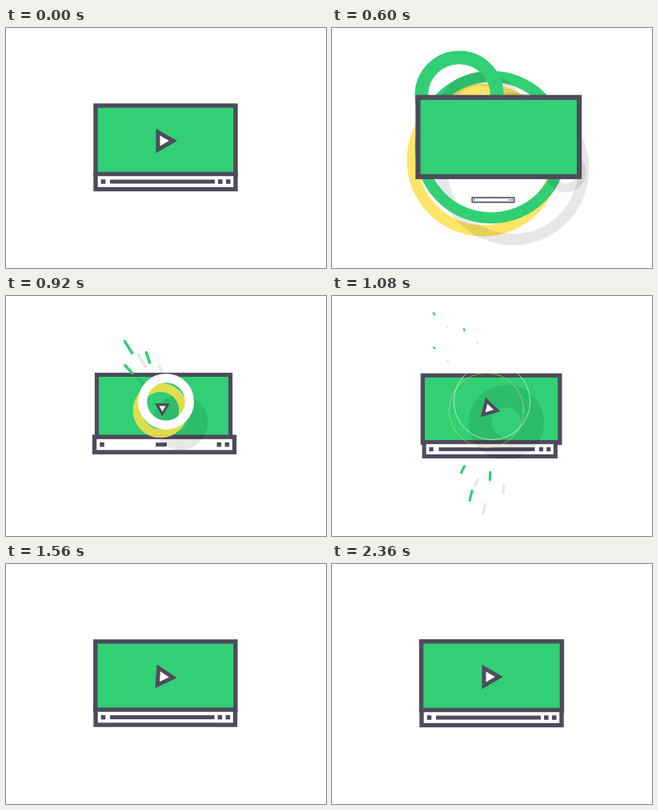
These frames come from a looping animation (400 by 300 pixels, 2.4 s). An HTML page:

```html
<!DOCTYPE html>
<html lang="en">
<head>
<meta charset="utf-8">
<title>Video player pop</title>
<style>
html, body { margin: 0; width: 100%; height: 100%; overflow: hidden; background: #fff; }
svg { display: block; width: 100vw; height: 100vh; }
</style>
</head>
<body>
<svg id="stage" viewBox="0 0 400 300"></svg>
<script>
const LOOP = 2400, STEP = 40, RETURN = 360;
const DARK = '#4d4b5c', GREEN = '#32cf74', TEAL = '#4fae9f', WHITE = '#fff';
const YELLOW = 'rgba(254,225,76,.85)', SHADE = 'rgba(0,0,0,.095)';
const stage = document.getElementById('stage');

const clamp = v => Math.min(1, Math.max(0, v));
const span = (t, from, to) => clamp((t - from) / (to - from));
const easeOut = (p, n = 3) => 1 - (1 - clamp(p)) ** n;
const easeInOut = (p, n) => p < .5 ? (2 * p) ** n / 2 : 1 - (2 - 2 * p) ** n / 2;
const backIn = p => p * p * (1.8 * p - .8);

// Damped swing that crosses zero at `cross` and every `half` ms around it
const swing = (t, cross, size, half = 300, decay = 234) =>
  size * Math.exp((cross - t) / decay) * Math.sin(Math.PI * (t - cross) / half);

const rect = (x, y, w, h, attrs) =>
  `<rect x="${x}" y="${y}" width="${w}" height="${h}" ${attrs}/>`;

const placed = (x, y, s, body) => s < .01 ? '' :
  `<g transform="translate(${x} ${y}) scale(${s})">${body}</g>`;

const panel = (h, fill) =>
  rect(-87.5, -h / 2, 175, h, `fill="${fill}" stroke="${DARK}" stroke-width="5.4"`);

function screen(t) {
  const body = panel(86, GREEN);
  if (t < RETURN) {
    const p = span(t, 40, RETURN);
    return placed(199.5, 140 + 60 * p * p, 1 - backIn(p), body);
  }
  return placed(
    199.5 + swing(Math.max(t, 507), 507, 15.8),
    140 - swing(t, 580, 23.6, 355, 181),
    span(t, RETURN, 440) * (1.005 + swing(t, 550, .364)) , body);
}

function bar(t) {
  const leaving = t < RETURN;
  const fill = leaving ? 1 - easeInOut(span(t, 40, 220), 3)
    : easeInOut(span(t, 760, 1200), 5);
  const w = .4 + 130.6 * fill, ink = `fill="${DARK}"`;
  const dots = [-78, 68.3, 78.3].map(x => rect(x - 2.8, -2.8, 5.6, 5.6, ink)).join('');
  const body = panel(19, WHITE) + dots + rect(-4 - w / 2, -2.5, w, 5, ink);
  if (leaving) {
    const p = span(t, 40, 260);
    return placed(199.5, 192 + 12 * p * p, 1 - backIn(p), body);
  }
  return placed(
    199.5 + swing(t, 590, 19.6),
    192 + swing(t, 493, 40.2),
    span(t, 560, 680) * (1 + swing(t, 620, .443)), body);
}

function ring(t, x, y, start, dur, size, color, hole = 1) {
  const p = (t - start) / dur;
  if (p <= 0 || p >= 1) return '';
  const outer = size * easeOut(p);
  const inner = size * hole * easeOut((p - .035) / .965, 1.7);
  const w = outer - inner;
  if (color === SHADE && w < 1) return '';
  const ink = color === GREEN && w < 1 ? TEAL : color;
  return `<circle cx="${x}" cy="${y}" r="${(outer + inner) / 2}" fill="none" stroke="${ink}" stroke-width="${w}"/>`;
}

// Green ring over its shifted shadow
const burst = (t, x, y, ...life) =>
  ring(t, x + 27, y + 27, ...life, SHADE) + ring(t, x, y, ...life, GREEN);

function backRings(t) {
  return ring(t, 189, 165, 420, 280, 100, YELLOW)
    + burst(t, 199, 149, 420, 280, 100)
    + burst(t, 159, 84, 520, 206, 72)
    + burst(t, 265, 153, 546, 280, 54);
}

function frontRings(t) {
  return ring(t, 218, 158, 821, 280, 47, SHADE, .4)
    + ring(t, 193, 143, 821, 280, 47, YELLOW)
    + ring(t, 200, 132, 821, 280, 48, WHITE);
}

// Three streaks fly out from the middle, each with a shifted shadow
function sparks(t, start, angle) {
  const p = (t - start) / 360;
  if (p <= 0 || p >= 1) return '';
  const head = easeOut(p), tail = easeOut(p - .08), w = 4.6 - 3 * p;
  const streak = (side, shift, color) => {
    const a = (angle + 12 * side) * Math.PI / 180;
    const reach = side ? 107 : 142;
    const point = k => `${200 + shift + Math.cos(a) * reach * k} ${141 + shift + Math.sin(a) * reach * k}`;
    return `<path d="M${point(tail)}L${point(head)}" stroke="${color}" stroke-width="${w}" stroke-linecap="round"/>`;
  };
  const fan = (...look) => [-1, 0, 1].map(side => streak(side, ...look)).join('');
  return fan(16.7, SHADE) + fan(0, p > .8 ? TEAL : GREEN);
}

function play(t) {
  let turn, s;
  if (t < RETURN) {
    const p = span(t, 0, 240);
    s = 1 - p * p;
    turn = -90 * p * p;
  } else {
    s = 1 - Math.exp(-Math.max(0, t - 736) / 190);
    turn = 180 * (1 - span(t, 800, 1160)) ** 1.7
      - swing(Math.max(t, 1160), 1160, 14.5, 240, 350);
  }
  return placed(196.3, 139.7, s,
    `<path transform="rotate(${turn})" d="M-6.3 -9.6L12.6 1.3L-6.3 12.2Z" fill="#fff" stroke="${DARK}" stroke-width="5"/>`);
}

function draw(t) {
  stage.innerHTML = backRings(t) + screen(t) + bar(t)
    + sparks(t, 802, -121.4) + sparks(t, 920, 103.7)
    + frontRings(t) + play(t);
}

const begin = performance.now();
function tick() {
  const t = (performance.now() - begin) % LOOP;
  draw(Math.floor(t / STEP) * STEP);
  requestAnimationFrame(tick);
}
tick();
</script>
</body>
</html>
```
